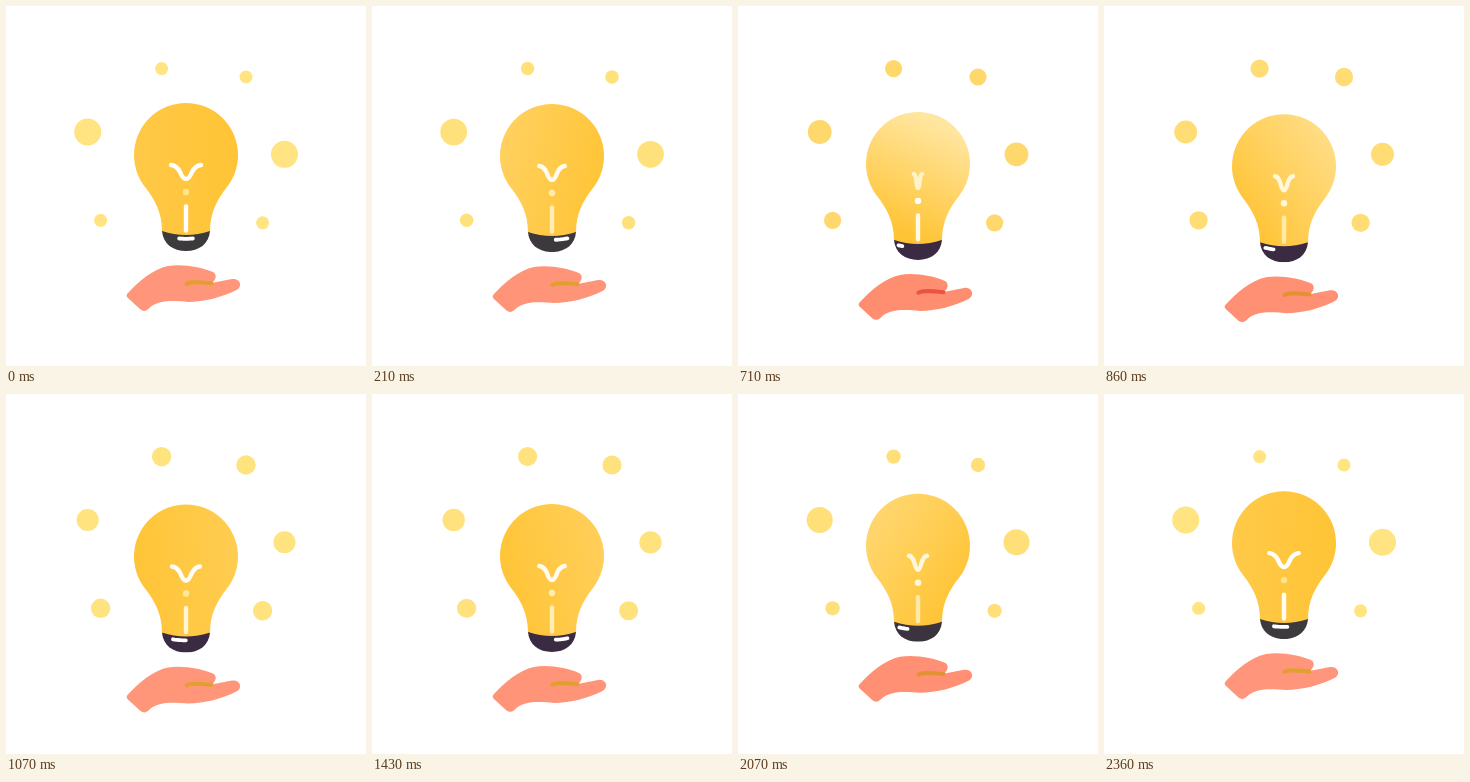
These frames come from a looping animation (360x360 px, 2430 ms). An HTML page:

```html
<!DOCTYPE html>
<html lang="en">
<head>
<meta charset="utf-8">
<title>Idea</title>
<style>
  html, body { margin: 0; width: 100%; height: 100%; overflow: hidden; background: #fff; }
  svg { display: block; width: 100%; height: 100%; }
  .line { fill: none; stroke-linecap: round; stroke-linejoin: round; }
</style>
</head>
<body>
<svg viewBox="0 0 360 360">
  <defs>
    <linearGradient id="glow" gradientUnits="userSpaceOnUse" x1="122" y1="162" x2="238" y2="162">
      <stop id="light" offset="0"/>
      <stop offset="1" stop-color="#ffc435"/>
    </linearGradient>
    <clipPath id="cap">
      <path d="M156 225 Q180 233 204 225 C203 238 193 245 180 245 C167 245 157 238 156 225Z"/>
    </clipPath>
  </defs>
  <g id="dots"></g>
  <g id="float">
    <path fill="url(#glow)" d="M139 181 A52 52 0 1 1 221 181 C211 194 204 206 204 226 Q180 234 156 226 C156 206 149 194 139 181Z"/>
    <path id="coil" class="line" stroke-width="4.4"/>
    <circle id="bead" cx="180" cy="186" r="3.2"/>
    <path id="stem" class="line" stroke-width="4.4" d="M180 200.5V224.5"/>
    <g clip-path="url(#cap)">
      <rect id="base" x="150" y="220" width="60" height="30"/>
      <path id="shine" class="line" stroke="#fff" stroke-width="3.8"/>
    </g>
    <path id="hand" d="M121.5 287.5 C132 276 147 263 162 260 C176 257.5 196 261 207 266 C211.5 268.5 210 274.5 205.5 277 L226 273 C234.5 272 237 280.5 230.5 284 C217 291 198 296 182 296 C170 295 152 293 143 302.5 C140 305.5 137 305.5 134.5 303.5 L122.5 292.5 C120.5 290.5 120 289.5 121.5 287.5Z"/>
    <path id="crease" class="line" stroke-width="4" d="M180.5 277.8 C184 275.3 193 276 205.5 277.3"/>
  </g>
</svg>
<script>
  const LOOP = 2430, STEPS = 34;
  const $ = id => document.getElementById(id);
  const set = (el, attrs) => { for (const k in attrs) el.setAttribute(k, attrs[k]); };
  const clamp = v => Math.min(1, Math.max(0, v));
  const mix = (a, b, k) =>
    `rgb(${a.map((v, i) => Math.round(v + (b[i] - v) * k)).join()})`;

  const WHITE = [255, 255, 255];
  const CREAM = [255, 233, 160];

  // x, y, radius and its swing over the loop
  const dots = [
    [81.7, 126, 12.25, 1.3], [278.5, 148.3, 12.25, 1.3],
    [155.6, 62.6, 8.15, -1.65], [240, 71, 8.15, -1.65],
    [94.6, 214.3, 8.15, -1.65], [256.6, 216.8, 8.15, -1.65]
  ].map(([x, y, r, swing]) => {
    const el = document.createElementNS($('dots').namespaceURI, 'circle');
    set(el, { cx: x, cy: y });
    $('dots').append(el);
    return { el, r, swing };
  });

  function coilPath(k) {
    const p = (x, y) => `${180 + x * k} ${y} `;
    return 'M' + p(-15, 159) + 'C' + p(-10.5, 159.5) + p(-8, 162) + p(-6, 166) +
      'C' + p(-4, 171) + p(-2.5, 173) + p(0, 173) +
      'C' + p(2.5, 173) + p(4, 171) + p(6, 166) +
      'C' + p(8, 162) + p(10.5, 159.5) + p(15, 159);
  }

  // Short arc on the cap's front half, wrapping from right to left
  function shinePath(turn) {
    const half = Math.PI / 2;
    const mid = (turn + half) % Math.PI - half;
    const from = Math.max(-half, mid - 0.36), to = Math.min(half, mid + 0.36);
    const points = [];
    for (let i = 0; i <= 6; i++) {
      const a = from + (to - from) * i / 6;
      points.push(`${180 + 19.5 * Math.sin(a)} ${232.8 - 2.4 * Math.sin(a) ** 2}`);
    }
    return 'M' + points.join('L');
  }

  function draw(time) {
    const step = Math.floor((time + 6) / LOOP * STEPS) % STEPS;
    const turn = 2 * Math.PI * step / STEPS;
    const c = Math.cos(turn), s = Math.sin(turn);
    const side = s * s;
    const low = (1 - c) / 2;
    const glow = 0.12 + side * (0.76 + 0.2 * s);

    set($('float'), { transform: `translate(0 ${14 * low})` });
    set($('glow'), { gradientTransform: `rotate(${180 * low} 180 162)` });
    set($('light'), { 'stop-color': mix([255, 197, 60], [255, 230, 160], glow) });

    set($('coil'), { d: coilPath(Math.abs(c)), stroke: mix(WHITE, CREAM, side * 0.6) });
    set($('bead'), { fill: mix([255, 227, 138], WHITE, clamp(side * 1.1)) });
    set($('stem'), { stroke: mix(WHITE, CREAM, Math.sin(2 * turn) ** 2) });
    set($('base'), { fill: mix([60, 58, 61], [58, 42, 66], clamp(2 * low)) });
    set($('shine'), { d: shinePath(turn) });

    set($('hand'), { fill: mix([255, 150, 123], [255, 141, 111], side) });
    set($('crease'), { stroke: mix([224, 160, 48], [234, 84, 64], clamp((side - 0.6) * 5)) });

    const tint = mix([255, 230, 132], [255, 216, 109], glow);
    for (const { el, r, swing } of dots) set(el, { r: r + swing * c, fill: tint });
  }

  const start = performance.now();
  function tick(now) {
    draw(Math.max(0, now - start));
    requestAnimationFrame(tick);
  }
  draw(0);
  requestAnimationFrame(tick);
</script>
</body>
</html>
```
